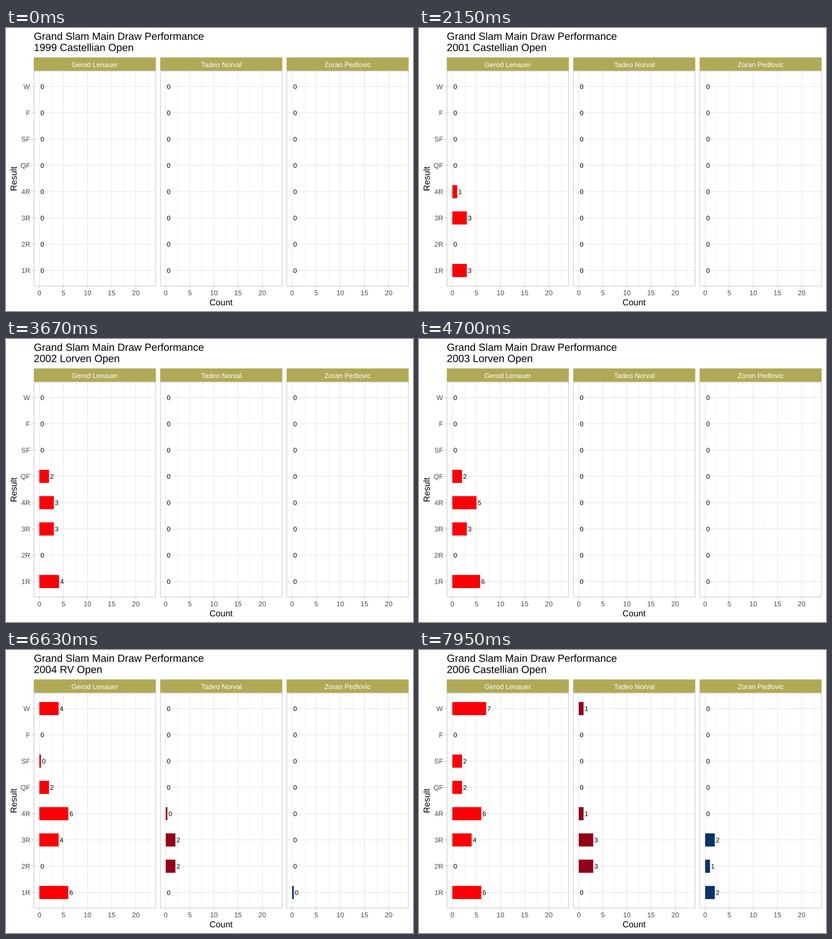
These frames come from a looping animation (720 by 500 pixels, 8 s). A matplotlib script:

```python
import numpy as np
import matplotlib.pyplot as plt
from matplotlib.animation import FuncAnimation
from matplotlib.collections import LineCollection, PolyCollection
from matplotlib.patches import PathPatch, Rectangle
from matplotlib.textpath import TextPath
from matplotlib.transforms import Affine2D

plt.rcParams["font.family"] = "Liberation Sans"

W, H = 720, 500
TICK_MS = 10
LOOP_MS = 8000

PLAYERS = ["Gerod Lenauer", "Tadeo Norval", "Zoran Pedlovic"]
COLORS = ["#fb0007", "#930017", "#0a326b"]
EVENTS = ["Castellian Open", "Lorven Open", "Thornmere", "RV Open"]
ROUNDS = ["1R", "2R", "3R", "4R", "QF", "SF", "F", "W"]

# One digit per event, four events a year from 1999: index of the round
# reached, counted from 1; a dot means the player was absent.
RESULTS = [
    ".11. 3413 3554 4114 4184 8388 6688 8",
    ".... .... .... .... ..32 3..2 4823 .",
    ".... .... .... .... .... .... 1233 1",
]

# Layout in pixels, y pointing down
LEFT, PANEL_W, STEP_X = 49.2, 215.95, 223.6
TOP, BOTTOM = 75.6, 456.3
STRIP_TOP = 52.0
ROW = (BOTTOM - TOP) / 8.2
UNIT = PANEL_W / 1.1 / 23
ZERO = PANEL_W * 0.05 / 1.1
BAR_H = ROW / 2
THIN = 0.73
TINY, SMALL, MEDIUM, LARGE = 11.6, 12.24, 15.3, 18.36

# Timing in ms
SLOT, HOLD, STEP_MS, STEPS = 290, 70, 20, 12


def running_totals():
    """Counts after each event, shape (events, players, rounds)."""
    n = len(RESULTS[0].replace(" ", ""))
    hits = np.zeros((n, len(PLAYERS), len(ROUNDS)))
    for p, line in enumerate(RESULTS):
        for i, c in enumerate(line.replace(" ", "")):
            if c != ".":
                hits[i, p, int(c) - 1] = 1
    return hits.cumsum(axis=0)


TOTALS = running_totals()


def panel_x(p):
    return LEFT + p * STEP_X


def row_y(r):
    return BOTTOM - ROW * (0.6 + r)


def state(t):
    """Event index and progress towards the next event at time t."""
    # the idle slot of the third event is cut short
    if t >= 670:
        t = max(t, 700) + 170
    i, rest = divmod(t, SLOT)
    step = 0 if rest < HOLD else (rest - HOLD) // STEP_MS + 1
    return i, step / STEPS


fig = plt.figure(figsize=(W / 72, H / 72), dpi=72, facecolor="white")
ax = fig.add_axes([0, 0, 1, 1])
ax.set_xlim(0, W)
ax.set_ylim(H, 0)
ax.axis("off")


def place(patch, x, y, angle=0):
    flip = Affine2D().rotate_deg(angle).scale(1, -1)
    patch.set_transform(flip.translate(x, y) + ax.transData)


def put(x, y, s, size, color="black", align="left", angle=0):
    """Text at a subpixel position; y is the baseline."""
    path = TextPath((0, 0), s, size=size)
    box = path.get_extents()
    shift = {"left": 0, "center": (box.x0 + box.x1) / 2,
             "right": box.x1}[align]
    patch = PathPatch(Affine2D().translate(-shift, 0).transform_path(path),
                      fc=color, ec="none", lw=0, snap=False, zorder=7)
    place(patch, x, y, angle)
    ax.add_artist(patch)
    return patch


def add_lines(segments, color, width):
    ax.add_collection(LineCollection(segments, colors=color, linewidths=width,
                                     capstyle="butt", snap=False, zorder=2),
                      autolim=False)


def draw_panels():
    major, minor, ticks = [], [], []
    for p, name in enumerate(PLAYERS):
        x0 = panel_x(p)
        x1 = x0 + PANEL_W
        ax.add_patch(Rectangle((x0, STRIP_TOP), PANEL_W, TOP - STRIP_TOP,
                               fc="#b0aa57", ec="none", snap=False, zorder=6))
        put((x0 + x1) / 2, 69, name, SMALL, "white", "center")
        for k in range(5):
            x = x0 + ZERO + 5 * k * UNIT
            xm = x + 2.5 * UNIT
            major.append([(x, TOP), (x, BOTTOM)])
            minor.append([(xm, TOP), (xm, BOTTOM)])
            ticks.append([(x, BOTTOM), (x, BOTTOM + 3.8)])
            put(x, 472.2, str(5 * k), SMALL, "#4d4d4d", "center")
        for r in range(len(ROUNDS)):
            major.append([(x0, row_y(r)), (x1, row_y(r))])
        ax.add_patch(Rectangle((x0 + THIN / 2, TOP + THIN / 2),
                               PANEL_W - THIN, BOTTOM - TOP - THIN,
                               fc="none", ec="#b3b3b3", lw=THIN, snap=False,
                               zorder=5))
    for r, name in enumerate(ROUNDS):
        y = row_y(r)
        ticks.append([(LEFT - 3.8, y), (LEFT, y)])
        put(42.3, y + 4.4, name, SMALL, "#4d4d4d", "right")
    add_lines(minor, "#dedede", THIN / 2)
    add_lines(major, "#dedede", THIN)
    add_lines(ticks, "#b3b3b3", THIN)


draw_panels()
put(LEFT, 20.9, "Grand Slam Main Draw Performance", LARGE)
put(LEFT + STEP_X + PANEL_W / 2, 490, "Count", MEDIUM, align="center")
put(18.8, (TOP + BOTTOM) / 2, "Result", MEDIUM, align="center", angle=90)
subtitle = put(LEFT, 40.7, "1999", LARGE)

DIGITS = [TextPath((0, 0), str(n), size=TINY) for n in range(10)]
CELLS = [(p, r) for p in range(len(PLAYERS)) for r in range(len(ROUNDS))]
labels = [put(0, 0, "0", TINY) for _ in CELLS]
bars = PolyCollection([], linewidths=0, snap=False, zorder=3)
ax.add_collection(bars, autolim=False)


def update(frame):
    i, progress = state(frame * TICK_MS)
    nxt = min(i + 1, len(TOTALS) - 1)
    counts = TOTALS[i] + (TOTALS[nxt] - TOTALS[i]) * progress

    near = nxt if progress >= 0.5 else i
    title = f"{1999 + near // 4} {EVENTS[near % 4]}"
    subtitle.set_path(TextPath((0, 0), title, size=LARGE))

    verts, colors = [], []
    for (p, r), label in zip(CELLS, labels):
        value = counts[p, r]
        y = row_y(r)
        x0 = panel_x(p) + ZERO
        x1 = x0 + value * UNIT
        label.set_path(DIGITS[int(value + 0.5)])
        place(label, x1 + 1.9, y + 4.2)
        if value > 0:
            y0, y1 = y - BAR_H / 2, y + BAR_H / 2
            verts.append([(x0, y0), (x1, y0), (x1, y1), (x0, y1)])
            colors.append(COLORS[p])
    bars.set_verts(verts)
    bars.set_facecolor(colors)
    return [bars, subtitle, *labels]


anim = FuncAnimation(fig, update, frames=LOOP_MS // TICK_MS,
                     interval=TICK_MS, repeat=True, repeat_delay=0,
                     init_func=lambda: update(0), blit=False)
plt.show()
```
